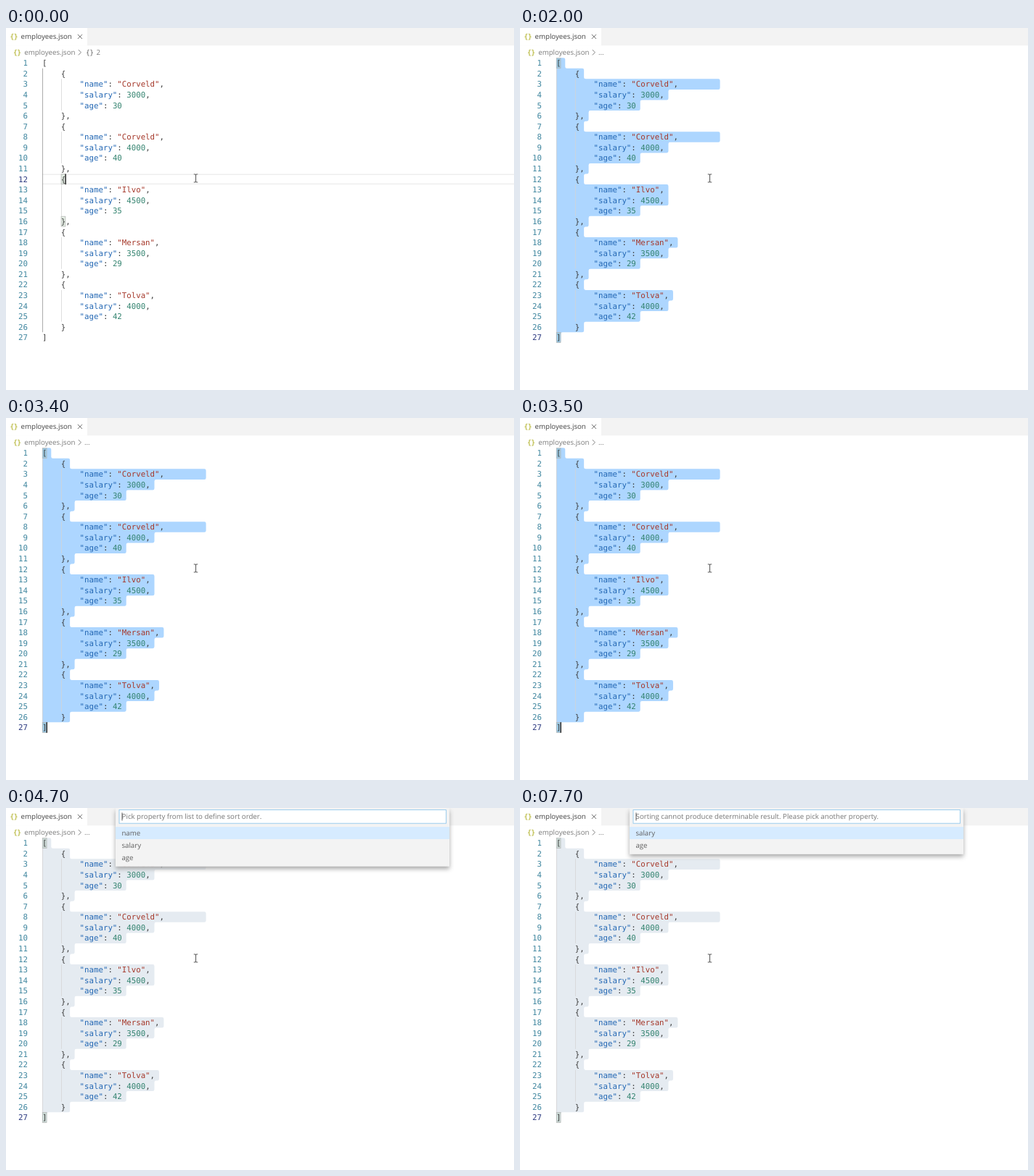
An HTML page with a canvas for the animation above (8000 ms loop, 700 by 500 pixels).

```html
<!DOCTYPE html>
<html lang="en">
<head>
<meta charset="utf-8">
<title>Sorting a JSON array</title>
<style>
  html, body { margin: 0; width: 100%; height: 100%; overflow: hidden; background: #fff; }
  canvas { display: block; }
</style>
</head>
<body>
<canvas id="stage" width="700" height="500"></canvas>
<script>
const ctx = document.getElementById('stage').getContext('2d');
ctx.textRendering = 'geometricPrecision';

const LOOP = 8000;
const SCALE = 0.767;            // editor pixels to stage pixels
const LEFT = 49.9, TOP = 41.2;  // origin of the code area
const ROW = 14.577, CHAR = 6.465;
const LINE_BREAK = 5.9;         // width of a selected line end
const CODE = '10.74px "DejaVu Sans Mono", monospace';
const UI = '9.7px "Open Sans", "Noto Sans", sans-serif';
const KEY = '8.2px "Open Sans", "Noto Sans", sans-serif';
const LIST_TOP = 26.1, LIST_ROW = 16.88;
const PANEL = { x: 151, w: 460 };

const COLOR = {
  key: '#2468b4', string: '#a5382a', number: '#33836f', plain: '#3c3c3c',
  line: '#3f869f', activeLine: '#2c3a80'
};

const people = [
  ['Corveld', 3000, 30, 8],
  ['Corveld', 4000, 40, 8],
  ['Ilvo', 4500, 35, 0],
  ['Mersan', 3500, 29, 0],
  ['Tolva', 4000, 42, 0]
];

const lines = ['['];
people.forEach(([name, salary, age, trailing], i) => {
  const pad = ' '.repeat(8);
  lines.push(
    '    {',
    `${pad}"name": "${name}",${' '.repeat(trailing)}`,
    `${pad}"salary": ${salary},`,
    `${pad}"age": ${age}`,
    i < people.length - 1 ? '    },' : '    }'
  );
});
lines.push(']');

const commands = [
  ['Sort JSON array', ''],
  ['Format Document', 'Ctrl+Shift+I'],
  ['Sort JSON array custom', ''],
  ['Close Window', 'Ctrl+X K'],
  ['Preferences: Color Theme', 'Ctrl+K Ctrl+T'],
  ['Add Cursor Above', ''],
  ['Add Cursor Below', 'Shift+Alt+DownArrow'],
  ['Add Cursors To Bottom', ''],
  ['Add Cursors to Line Ends', 'Shift+Alt+I'],
  ['Add Cursors To Top', ''],
  ['Add Line Comment', 'Ctrl+K Ctrl+C'],
  ['Add Selection To Next Find Match', 'Ctrl+Alt+N'],
  ['Add Selection To Previous Find Match', ''],
  ['Back', 'Ctrl+Alt+-'],
  ['Change All Occurrences', 'Ctrl+F2'],
  ['Change End of Line Sequence', ''],
  ['Change File Encoding', '']
];

const colX = col => LEFT + col * CHAR;
const rowY = row => TOP + (row - 1) * ROW;

function rect(x, y, w, h, color) {
  ctx.fillStyle = color;
  ctx.fillRect(x, y, w, h);
}

function text(str, x, y, color, font = UI, align = 'left') {
  ctx.font = font;
  ctx.textAlign = align;
  ctx.fillStyle = color;
  ctx.fillText(str, x, y);
}

function stroke(points, color, width) {
  ctx.beginPath();
  points.forEach(([x, y], i) => i ? ctx.lineTo(x, y) : ctx.moveTo(x, y));
  ctx.strokeStyle = color;
  ctx.lineWidth = width;
  ctx.stroke();
}

function braces(x, y, gap, color, weight) {
  const font = `${weight} 9.5px "DejaVu Sans Mono", monospace`;
  text('{', x, y, color, font);
  text('}', x + gap, y, color, font);
}

function drawHeader(t) {
  rect(0, 0, 700, 24.3, '#f3f3f3');
  rect(0, 0, 112, 24.3, '#fff');
  braces(5.5, 15.2, 5.3, '#bfbf50', 'bold');
  text('employees.json', 20.5, 15.4, '#444');
  stroke([[98.8, 8.8], [105, 15]], '#666', 0.9);
  stroke([[105, 8.8], [98.8, 15]], '#666', 0.9);

  braces(10, 36.8, 5.3, '#bfbf50', 'bold');
  text('employees.json', 25.2, 36.9, '#7b7b7b');
  stroke([[99.8, 30], [103.4, 33.7], [99.8, 37.4]], '#777', 0.9);
  if (t < 1200) {
    braces(110, 36.6, 5.2, '#666', 'normal');
    text('2', 124.6, 36.9, '#7b7b7b');
  } else {
    text('…', 108, 36.9, '#7b7b7b');
  }
}

function selectionAt(t) {
  if (t < 400) return null;
  if (t < 800) return [12, 5, 16, 4];
  if (t < 1100) return [12, 4, 16, 6];
  if (t < 1400) return [12, 0, 16, 6];
  return [1, 0, 27, 1];
}

// Outline of all selected rows, with rounded inner and outer corners.
function drawSelection([r1, c1, r2, c2], color) {
  const pts = [[colX(c1), rowY(r1)]];
  let last = null;
  for (let r = r1; r <= r2; r++) {
    const x = r === r2 ? colX(c2) : colX(lines[r - 1].length) + LINE_BREAK;
    if (x !== last) {
      if (last !== null) pts.push([last, rowY(r)]);
      pts.push([x, rowY(r)]);
    }
    last = x;
  }
  pts.push([last, rowY(r2 + 1)], [LEFT, rowY(r2 + 1)]);
  if (c1 > 0) pts.push([LEFT, rowY(r1 + 1)], [colX(c1), rowY(r1 + 1)]);

  const n = pts.length, [a, z] = [pts[0], pts[n - 1]];
  ctx.beginPath();
  ctx.moveTo((a[0] + z[0]) / 2, (a[1] + z[1]) / 2);
  pts.forEach((p, i) => ctx.arcTo(...p, ...pts[(i + 1) % n], 2.3));
  ctx.closePath();
  ctx.fillStyle = color;
  ctx.fill();
}

function drawGuides(active) {
  rect(LEFT + 0.2, rowY(2), SCALE, 25 * ROW, active ? '#939393' : '#d3d3d3');
  for (let i = 0; i < people.length; i++) {
    rect(colX(4) + 0.2, rowY(3 + i * 5), SCALE, 3 * ROW, '#d3d3d3');
  }
}

function drawBracket(row, col) {
  const x = colX(col), y = rowY(row);
  rect(x, y, CHAR, ROW, 'rgba(0,100,0,.1)');
  ctx.strokeStyle = '#b9b9b9';
  ctx.lineWidth = SCALE;
  ctx.strokeRect(x + 0.4, y + 0.4, CHAR - 0.8, ROW - 0.8);
}

function drawLine(str, row) {
  const y = rowY(row) + 11.1;
  for (const m of str.matchAll(/"\w+"(?=:)|"\w+"|\d+|[^\s"\d]+/g)) {
    const tok = m[0];
    let kind = 'plain';
    if (tok[0] === '"') kind = str[m.index + tok.length] === ':' ? 'key' : 'string';
    else if (/\d/.test(tok)) kind = 'number';
    text(tok, colX(m.index), y, COLOR[kind], CODE);
  }
}

function drawEditor(t, focused) {
  const sel = selectionAt(t);
  const row = t < 400 ? 12 : t < 1400 ? 16 : 27;
  const col = t < 400 ? 5 : t < 800 ? 4 : t < 1400 ? 6 : 1;

  if (sel) {
    drawSelection(sel, focused ? '#add6ff' : '#e5ebf1');
  } else {
    rect(LEFT, rowY(row), 700, 1.5, '#eee');
    rect(LEFT, rowY(row + 1) - 1.5, 700, 1.5, '#eee');
  }
  drawGuides(!sel);
  if (t < 900) {
    drawBracket(12, 4);
    drawBracket(16, 4);
  } else if (t >= 1600) {
    drawBracket(1, 0);
    drawBracket(27, 0);
  }
  lines.forEach((str, i) => {
    const n = i + 1;
    const color = n === row ? COLOR.activeLine : COLOR.line;
    text(n, 30, rowY(n) + 11.1, color, CODE, 'right');
    drawLine(str, n);
  });

  const caret = t < 100 || (t >= 400 && t < 2000) || (t >= 3400 && focused);
  if (caret) rect(colX(col) - 0.8, rowY(row), 1.4, ROW, '#222');
}

function drawPanel(rows) {
  const h = LIST_TOP + rows * LIST_ROW + 4;
  ctx.save();
  ctx.shadowColor = '#a8a8a8';
  ctx.shadowBlur = 6.1;
  ctx.shadowOffsetY = 3.8;
  rect(PANEL.x, 0, PANEL.w, h, '#f3f3f3');
  ctx.restore();
  rect(156, 2.6, 450.4, 18.6, '#fff');
  ctx.strokeStyle = '#90c7ec';
  ctx.lineWidth = 0.9;
  ctx.strokeRect(156, 2.6, 450.4, 18.6);
}

function drawItem(label, i, back) {
  const y = LIST_TOP + i * LIST_ROW;
  if (back) rect(PANEL.x, y, PANEL.w, LIST_ROW, back);
  text(label, 159.4, y + 11.8, '#616161');
}

// Key caps are laid out from the right edge towards the left.
function drawKeys(combo, mid) {
  let right = 597;
  const parts = combo.split(/([+ ])/).reverse();
  for (const part of parts) {
    if (part === ' ') {
      right -= 8.5;
    } else if (part === '+') {
      text('+', right - 5, mid + 3.3, '#616161', UI, 'center');
      right -= 10;
    } else {
      ctx.font = KEY;
      const w = ctx.measureText(part).width + 9;
      const x = right - w;
      ctx.beginPath();
      ctx.roundRect(x + 0.4, mid - 6.4, w - 0.8, 12.6, 2.3);
      ctx.fillStyle = 'rgba(221,221,221,.4)';
      ctx.fill();
      ctx.strokeStyle = 'rgba(204,204,204,.5)';
      ctx.lineWidth = SCALE;
      ctx.stroke();
      rect(x + 2, mid + 5.8, w - 4, SCALE, 'rgba(187,187,187,.5)');
      text(part, x + w / 2, mid + 2.9, '#555', KEY, 'center');
      right = x;
    }
  }
}

function drawPalette(t) {
  drawPanel(commands.length);
  text('>', 159.6, 15.5, '#616161');
  if (t < 3000) rect(164.6, 6.8, 0.8, 11, '#333');
  commands.forEach(([label, keys], i) => {
    drawItem(label, i, i === 0 ? '#d6ebff' : i === 10 ? '#e8e8e8' : null);
    if (keys) drawKeys(keys, LIST_TOP + (i + 0.5) * LIST_ROW);
  });
  rect(PANEL.x, LIST_TOP + 5 * LIST_ROW - 0.2, PANEL.w, SCALE, '#cccedb');
  text('recently used', 597, LIST_TOP + 11.8, '#006ab1', UI, 'right');
  text('other commands', 597, LIST_TOP + 5 * LIST_ROW + 11.8, '#006ab1', UI, 'right');
  rect(603.3, LIST_TOP, 7.7, 15.3, 'rgba(100,130,160,.13)');
}

function drawPicker(hint, items, caret) {
  drawPanel(items.length);
  text(hint, 159.6, 15.4, '#767676');
  if (caret) rect(159.6, 6.4, 0.8, 11, '#333');
  items.forEach((label, i) => drawItem(label, i, i ? null : '#d6ebff'));
}

function drawIBeam() {
  const x = 261.5, top = 202, bottom = 213;
  const bars = [
    [[x - 2.8, top], [x - 0.8, top], [x, top + 0.9], [x + 0.8, top], [x + 2.8, top]],
    [[x, top + 0.9], [x, bottom - 0.9]],
    [[x - 2.8, bottom], [x - 0.8, bottom], [x, bottom - 0.9], [x + 0.8, bottom], [x + 2.8, bottom]]
  ];
  bars.forEach(b => stroke(b, '#fff', 2.6));
  bars.forEach(b => stroke(b, '#666', 1.2));
}

function drawHand() {
  ctx.save();
  ctx.translate(257, 204.5);
  ctx.beginPath();
  ctx.moveTo(3, 8);
  ctx.lineTo(3, 1.5);
  ctx.quadraticCurveTo(4, 0, 5, 1.5);
  ctx.lineTo(5, 5);
  ctx.quadraticCurveTo(6.2, 4, 7.1, 5.3);
  ctx.quadraticCurveTo(8.3, 4.5, 9.1, 5.8);
  ctx.quadraticCurveTo(10.6, 5.3, 10.8, 7);
  ctx.quadraticCurveTo(10.9, 9.6, 9.4, 12.4);
  ctx.lineTo(4, 12.4);
  ctx.quadraticCurveTo(2, 10, 0.4, 7.6);
  ctx.quadraticCurveTo(0.8, 5.8, 3, 8);
  ctx.closePath();
  ctx.fillStyle = '#fff';
  ctx.fill();
  ctx.strokeStyle = '#222';
  ctx.lineWidth = 1;
  ctx.stroke();
  ctx.restore();
  [5, 7.1, 9.1].forEach(x => stroke([[257 + x, 210], [257 + x, 212]], '#333', 0.7));
}

function draw(t) {
  const palette = t >= 2400 && t < 3400;
  const picker = t >= 3600;
  rect(0, 0, 700, 500, '#fff');
  drawEditor(t, !palette && !picker);
  drawHeader(t);
  if (palette) {
    drawPalette(t);
  } else if (picker && t < 6600) {
    const caret = t < 4100 || (t >= 4700 && t < 5000) || (t >= 5600 && t < 6200);
    drawPicker('Pick property from list to define sort order.', ['name', 'salary', 'age'], caret);
  } else if (picker) {
    drawPicker('Sorting cannot produce determinable result. Please pick another property.',
      ['salary', 'age'], t < 7200 || t >= 7700);
  }
  if (palette) drawHand();
  else drawIBeam();
}

const start = performance.now();
function tick() {
  draw((performance.now() - start) % LOOP);
  requestAnimationFrame(tick);
}
tick();
</script>
</body>
</html>
```
